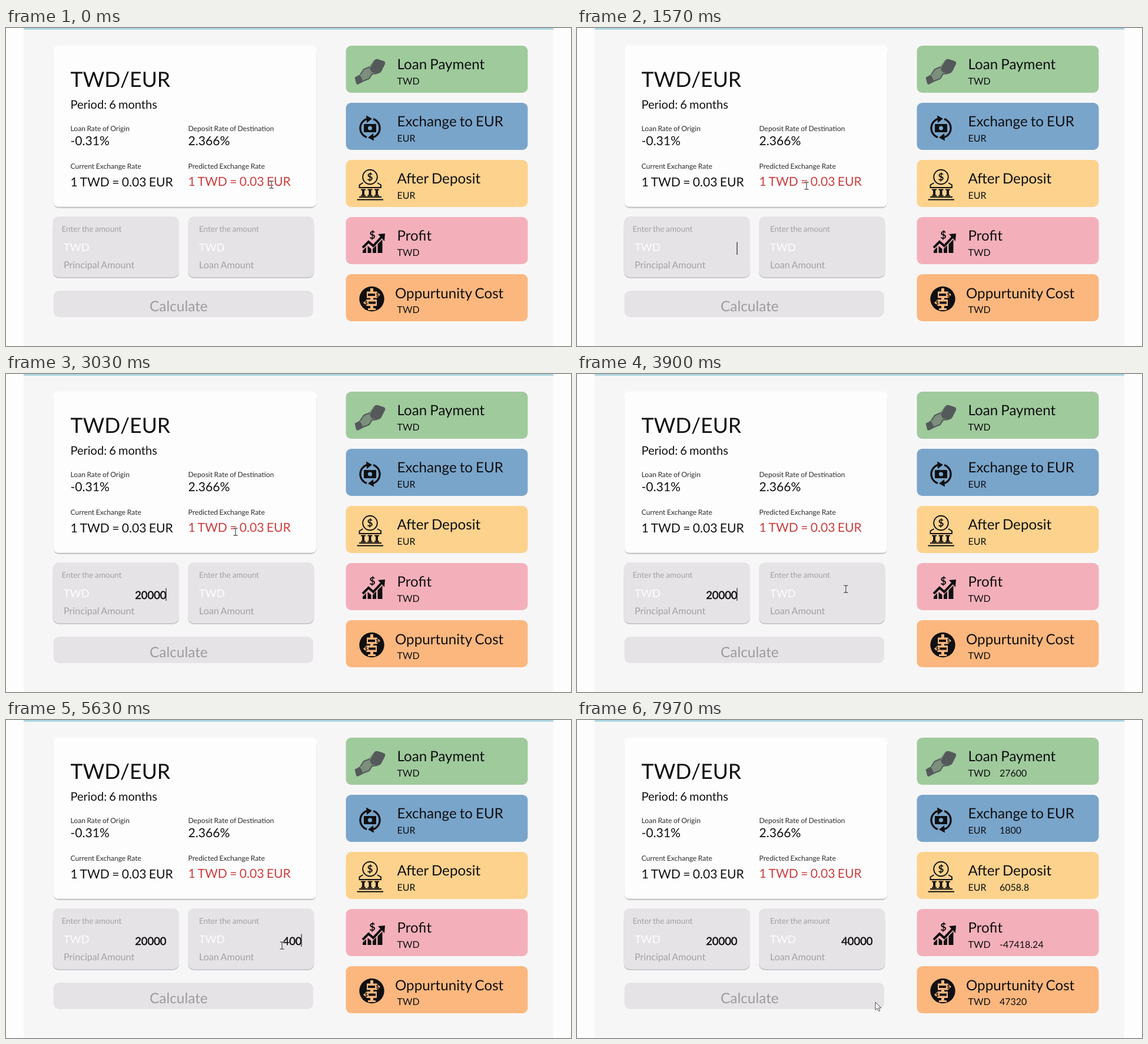
Write an HTML page that moves like this. It is 960 px wide and 540 px high and loops after 8 s.

```html
<!DOCTYPE html>
<html lang="en">
<head>
<meta charset="utf-8">
<title>Loan calculator</title>
<style>
  html, body { margin: 0; width: 100%; height: 100%; overflow: hidden; background: #fdfdfd; }
  svg { display: block; width: 100vw; height: 100vh; font-family: Lato, sans-serif; }
  text { text-rendering: geometricPrecision; white-space: pre; word-spacing: -.05em; }
  .title { font-size: 35.6px; }
  .period { font-size: 20px; }
  .label { font-size: 12.1px; fill: #2c2c2e; }
  .rate { font-size: 21.1px; }
  .predicted { fill: #cb3d3d; }
  .hint { font-size: 13.5px; fill: #a3a1a4; }
  .unit { font-size: 18.3px; fill: #fdfcfd; }
  .caption { font-size: 16.1px; fill: #a3a1a4; }
  .amount { font-size: 18.4px; text-anchor: end; stroke: #101012; stroke-width: .55; }
  .button { font-size: 24.4px; fill: #9d9b9e; }
  .heading { font-size: 24.2px; }
  .small { font-size: 16px; }
  .field { fill: #e6e3e7; }
  .shade { fill: #c9c7cb; }
</style>
</head>
<body>
<svg viewBox="0 0 960 540" fill="#101012">
  <rect width="960" height="540" fill="#fdfdfd"/>
  <rect x="30" width="900" height="540" fill="#f7f6f7"/>
  <rect x="30" width="900" height="3" fill="#add6e0"/>

  <rect class="shade" x="80.5" y="34" width="447" height="272" rx="9"/>
  <rect x="80.5" y="29.5" width="447" height="274" rx="8" fill="#fdfdfd"/>
  <text class="title" x="109.5" y="99.5">TWD/EUR</text>
  <text class="period" x="109.5" y="137">Period: 6 months</text>
  <text class="label" x="109.5" y="175">Loan Rate of Origin</text>
  <text class="rate" x="109.5" y="199">-0.31%</text>
  <text class="label" x="309.5" y="175">Deposit Rate of Destination</text>
  <text class="rate" x="309.5" y="199">2.366%</text>
  <text class="label" x="109.5" y="239">Current Exchange Rate</text>
  <text class="rate" x="109.5" y="268.5">1 TWD = 0.03 EUR</text>
  <text class="label" x="309.5" y="239">Predicted Exchange Rate</text>
  <text class="rate predicted" x="309.5" y="268">1 TWD = 0.03 EUR</text>

  <rect class="shade" x="79.5" y="330" width="214.5" height="95" rx="10"/>
  <rect class="field" x="79.5" y="320" width="214.5" height="103" rx="10"/>
  <text class="hint" x="94.5" y="346">Enter the amount</text>
  <text class="unit" x="98" y="379">TWD</text>
  <text class="caption" x="98" y="408">Principal Amount</text>
  <rect class="shade" x="309" y="330" width="214.5" height="95" rx="10"/>
  <rect class="field" x="309" y="320" width="214.5" height="103" rx="10"/>
  <text class="hint" x="328" y="346">Enter the amount</text>
  <text class="unit" x="328" y="379">TWD</text>
  <text class="caption" x="328" y="408">Loan Amount</text>
  <text class="amount" id="principal" x="272.5" y="381.5"></text>
  <text class="amount" id="loan" x="502.5" y="381.5"></text>
  <path id="caret" d="M0 363.5V385" stroke="#252527" stroke-width="1.2"/>

  <rect class="field" x="80.5" y="446" width="441.5" height="45" rx="10"/>
  <text class="button" x="244" y="480.5">Calculate</text>

  <g id="cards"></g>

  <!-- hand with banknotes -->
  <g fill="#54595a">
    <path d="M592.5 84l9-5 6 12-10 5q-2 0-2.5-2z"/>
    <path d="M602 79l6-9 8-3 9-12q3-3 7-2l9 3q4 1 3 5l-6 12q-2 4-7 5l-9 1-5 8-10 4z" fill="#7b8f7c"/>
    <path d="M618 69l8-14q2-3 6-2l9 3q4 1 3 5l-6 12q-2 4-7 4l-10-2z"/>
    <path d="M602 79l6-9 10-4M607 90l10-4 5-8 9-1" fill="none" stroke="#54595a" stroke-width="2"/>
  </g>

  <!-- circular exchange -->
  <g fill="none" stroke="#101012" stroke-width="3.2">
    <path d="M613 185.600A16.500 16.500 0 0 1 613 154.400M624 154.400A16.500 16.500 0 0 1 624 185.600"/>
    <path d="M612 148.500l10 5.500-9 7zM625 191.500l-10-5.500 9-7z" fill="#101012" stroke="none"/>
    <rect x="608" y="163" width="21" height="14" rx="1" fill="#101012" stroke="none"/>
    <circle cx="618.5" cy="170" r="3.600" fill="#79a5cb" stroke="none"/>
  </g>

  <!-- bank with coin -->
  <g fill="none" stroke="#101012" stroke-width="1.900">
    <circle cx="618.5" cy="253" r="12.300"/>
    <path d="M606.500 263l-6 3.500v4.500h36.500v-4.500l-6-3.500M600 287h38M596.500 291.500h44.500"/>
    <path d="M603 274.500h8M603 284.500h8M614.500 274.500h8M614.500 284.500h8M626 274.500h8M626 284.500h8"/>
    <path d="M607 274v11M618.500 274v11M630 274v11" stroke-width="4"/>
  </g>
  <text x="618.5" y="259" font-size="17" font-weight="700" text-anchor="middle">$</text>

  <!-- rising chart -->
  <path d="M606 378l6-6v10h-6zM614.500 370l6 5v7h-6zM623 375l6-6v13h-6zM631.500 367l8-8v23h-8z"/>
  <path d="M606 373l10-10 8 7 15-16" fill="none" stroke="#101012" stroke-width="4"/>
  <path d="M632 350l12-1-1 13z"/>
  <text x="622.5" y="358" font-size="18" font-weight="700" text-anchor="middle">$</text>

  <!-- signpost -->
  <circle cx="621.5" cy="460" r="21.200"/>
  <g fill="#fbb77e">
    <path d="M619 442h5v36h-5zM615 476h13v3h-13z"/>
    <path d="M613 447.500h17l6 5.500-6 5.500h-17zM630 461h-17l-6 5.500 6 5.500h17z"/>
  </g>
  <path d="M615 453h12M616 466.500h12" stroke="#101012" stroke-width="4"/>
  <g font-size="9" font-weight="700" text-anchor="middle">
    <text x="631" y="456">$</text><text x="612" y="469.500">$</text>
  </g>

  <g id="pointer">
    <g id="beam" fill="none">
      <path d="M-3.500-6H-1L0-5L1-6H3.500M0-5V5M-3.500 6H-1L0 5L1 6H3.500" stroke="#fff" stroke-opacity=".5" stroke-width="2.600"/>
      <path d="M-3.500-6H-1L0-5L1-6H3.500M0-5V5M-3.500 6H-1L0 5L1 6H3.500" stroke="#555557" stroke-width="1.300"/>
    </g>
    <path id="arrow" d="M0-8V5.500L3.200 2.700L5.500 7.600L7.700 6.600L5.500 1.900H9.800Z" fill="#fdfdfd" stroke="#4b4b4d"/>
  </g>
</svg>
<script>
const $ = id => document.getElementById(id);
const LOOP = 8000, BLINK = 1060, RESULT_AT = 7400;

const cards = [
  ['Loan Payment', 'TWD', '27600', '#9fca9c'],
  ['Exchange to EUR', 'EUR', '1800', '#79a5cb'],
  ['After Deposit', 'EUR', '6058.8', '#fcd28d'],
  ['Profit', 'TWD', '-47418.24', '#f4b0ba'],
  ['Oppurtunity Cost', 'TWD', '47320', '#fbb77e']
];
$('cards').innerHTML = cards.map(([name, unit, value, color], i) => {
  const y = 30 + 97 * i, last = i === 4;
  return `<rect x="577.5" y="${y}" width="309" height="80" rx="9" fill="${color}"/>
    <text class="heading" x="${last ? 661 : 664.5}" y="${y + (last ? 41 : 40)}">${name}</text>
    <text class="small" x="664.5" y="${y + 66}">${unit}</text>
    <text class="small result" x="718" y="${y + 66}">${value}</text>`;
}).join('');
const results = document.querySelectorAll('.result');

const fields = [
  { el: $('principal'), text: '20000', caretX: 272, focus: 1060, blur: 4200, keys: [2050, 2300, 2480, 2640, 2800] },
  { el: $('loan'), text: '40000', caretX: 502, focus: 4200, blur: 7250, keys: [5150, 5370, 5550, 5730, 5900] }
];

// time, x, y
const path = [
  [0, 451, 266], [750, 245, 376], [1080, 245, 376], [1450, 390, 268],
  [3450, 390, 268], [4050, 469, 383], [6250, 469, 383], [6900, 341, 478],
  [7350, 341, 478], [7850, 507, 487], [LOOP, 507, 487]
];
const ease = p => p * p * (3 - 2 * p);

function pointerAt(t) {
  const i = path.findIndex(p => p[0] > t);
  const [t0, x0, y0] = path[i - 1], [t1, x1, y1] = path[i];
  const p = ease((t - t0) / (t1 - t0));
  return [x0 + (x1 - x0) * p, y0 + (y1 - y0) * p];
}

function isTextual(x, y) {
  const inField = y > 320 && y < 423 && (x > 80 && x < 294 || x > 309 && x < 523);
  return inField || y > 228 && y < 276 && x < 490;
}

function draw(now) {
  const t = now % LOOP;
  let caretX = null;
  for (const f of fields) {
    const typed = f.keys.filter(k => k <= t);
    f.el.textContent = f.text.slice(0, typed.length);
    const since = t - Math.max(f.focus, ...typed);
    if (t >= f.focus && t < f.blur && since % BLINK < BLINK / 2) caretX = f.caretX;
  }
  $('caret').style.display = caretX === null ? 'none' : '';
  if (caretX !== null) $('caret').setAttribute('transform', `translate(${caretX})`);

  const [x, y] = pointerAt(t), textual = isTextual(x, y);
  $('pointer').setAttribute('transform', `translate(${x} ${y})`);
  $('beam').style.display = textual ? '' : 'none';
  $('arrow').style.display = textual ? 'none' : '';
  results.forEach(r => r.style.display = t >= RESULT_AT ? '' : 'none');
}

const start = performance.now();
function tick() {
  draw(performance.now() - start);
  requestAnimationFrame(tick);
}
tick();
</script>
</body>
</html>
```
